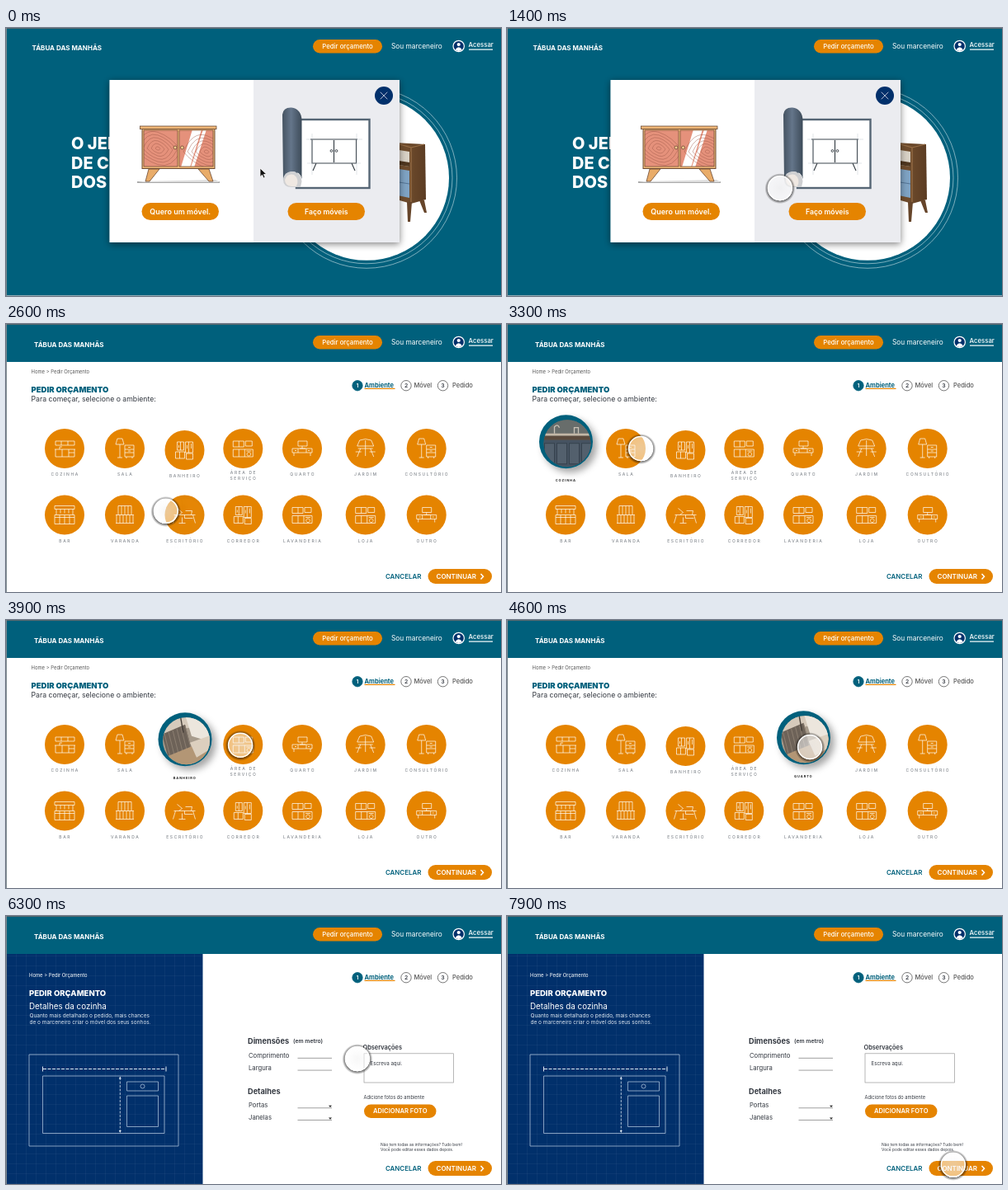
Recreate the animation shown at these times as an HTML page. Size 600 by 325 pixels, loop 8000 ms.

```html
<!DOCTYPE html>
<html lang="pt">
<head>
<meta charset="utf-8">
<title>Pedir orçamento</title>
<style>
html, body { margin: 0; width: 100%; height: 100%; overflow: hidden; background: #fff; }
svg { display: block; width: 100vw; height: 100vh; font-family: Inter, "Open Sans", sans-serif; }
</style>
</head>
<body>
<svg id="stage" viewBox="0 0 600 325" preserveAspectRatio="none"></svg>
<script>
const LOOP = 8000;
const TEAL = '#00607c', ORANGE = '#e58400', NAVY = '#01306b', INK = '#333840';
const stage = document.getElementById('stage');

// Drawing helpers
const text = (x, y, str, size, fill = INK, weight = 400, extra = '') =>
  `<text x="${x}" y="${y}" font-size="${size}" fill="${fill}" font-weight="${weight}" ${extra}>${str}</text>`;
const mid = 'text-anchor="middle"';
const rect = (x, y, w, h, fill, extra = '') =>
  `<rect x="${x}" y="${y}" width="${w}" height="${h}" fill="${fill}" ${extra}/>`;
const circle = (x, y, r, fill, extra = '') =>
  `<circle cx="${x}" cy="${y}" r="${r}" fill="${fill}" ${extra}/>`;
const line = (d, stroke, width = 1, extra = '') =>
  `<path d="${d}" fill="none" stroke="${stroke}" stroke-width="${width}" ${extra}/>`;
const shape = (d, fill, extra = '') => `<path d="${d}" fill="${fill}" ${extra}/>`;
const pill = (x, y, w, h, label, size, weight = 500) =>
  rect(x, y, w, h, ORANGE, `rx="${h / 2}"`) +
  text(x + w / 2, y + h / 2 + size * .35, label, size, '#fff', weight, mid);
const repeat = (n, fn) => Array.from({ length: n }, (_, i) => fn(i)).join('');

const defs = `<defs>
  <filter id="shadow" x="-20%" y="-20%" width="140%" height="150%"><feDropShadow dx="0" dy="2" stdDeviation="4" flood-opacity=".5"/></filter>
  <filter id="cardShadow" x="-40%" y="-40%" width="190%" height="190%"><feDropShadow dx="5" dy="5" stdDeviation="4" flood-opacity=".35"/></filter>
  <linearGradient id="roll"><stop stop-color="#455361"/><stop offset=".45" stop-color="#64758a"/><stop offset="1" stop-color="#3d4b59"/></linearGradient>
  <linearGradient id="walnut"><stop stop-color="#7d5733"/><stop offset="1" stop-color="#5b3c23"/></linearGradient>
  <radialGradient id="lens"><stop stop-color="#f2f2f2" stop-opacity=".62"/><stop offset="1" stop-color="#fff" stop-opacity=".5"/></radialGradient>
  <radialGradient id="halo"><stop offset=".8" stop-opacity="0"/><stop offset=".81" stop-opacity=".55"/><stop offset="1" stop-opacity="0"/></radialGradient>
  <pattern id="grid" width="12" height="12" patternUnits="userSpaceOnUse">${line('M0 .5H12M.5 0V12', '#fff', .5, 'opacity=".08"')}</pattern>
  <clipPath id="leftDoor"><path d="M167 124h41v44h-41z"/></clipPath>
  <clipPath id="rightDoor"><path d="M210 124h41v44h-41z"/></clipPath>
  <clipPath id="photo"><circle cx="1.5" cy="2" r="28.5"/></clipPath>
</defs>`;

const nav = (x, y) =>
  text(x, y, 'TÁBUA DAS MANHÃS', 8, '#fff', 700) +
  pill(372, 14, 84, 16.5, 'Pedir orçamento', 7.8) +
  text(467, 24.7, 'Sou marceneiro', 8.3, '#fff') +
  circle(548.7, 22, 6.7, NAVY, 'stroke="#fff" stroke-width="1.2"') +
  circle(548.7, 20, 2.1, '#fff') + shape('M544.6 26.3q4.1-6 8.2 0q-4.1 3.2-8.2 0z', '#fff') +
  text(560.5, 22.8, 'Acessar', 7.8, '#fff', 500) + rect(561, 25.5, 29, 1.2, '#fff');
const windowEdge = rect(0, 0, 600, 1, '#56676e') + rect(0, 0, 1, 325, '#7d8a90');

// Landing page with the choice dialog
function grain(cx, cy, clip) {
  return `<g clip-path="url(#${clip})">` + repeat(6, i => {
    const r = 3 + i * 5;
    return line(`M${cx - r} ${cy}q${r * .4} ${-r * .9} ${r} ${-r * .7}t${r} ${r * .8}q${-r * .4} ${r * .8} ${-r} ${r * .6}t${-r} ${-r * .7}`, '#9a5646', .45);
  }) + '</g>';
}

const woodCabinet =
  line('M159 187H259', '#555', 1) + shape('M166 186l88-2 5 3H160z', '#ddd') +
  shape('M173 171h13l-12 15h-5zM233 171h13l5 15h-5z', '#e9ac69', 'stroke="#6b4a33" stroke-width=".8"') +
  rect(165, 122, 88, 48.5, '#efb778', 'stroke="#6b4a33"') +
  rect(162.5, 119, 92.5, 3.6, '#efb778', 'stroke="#6b4a33" stroke-width=".8"') +
  rect(167, 124, 41, 44, '#e5917b') + rect(210, 124, 41, 44, '#e5917b') +
  `<g clip-path="url(#rightDoor)">${shape('M226 123h11l-14 46h-11zM239 123h4l-15 46h-4z', '#fff')}</g>` +
  grain(184, 146, 'leftDoor') + grain(243, 150, 'rightDoor') +
  line('M167 124H208V168H167ZM210 124H251V168H210Z', '#6b4a33', .7) +
  circle(205, 145, 2, '#f5c98e', 'stroke="#6b4a33" stroke-width=".8"') +
  circle(213.5, 145, 2, '#f5c98e', 'stroke="#6b4a33" stroke-width=".8"');

const blueprintRoll =
  rect(352, 111, 88.5, 83, '#fff', 'stroke="#566675" stroke-width="2.4"') +
  line('M369 135H426M371 135V164H424.5V135M397.5 136V163M376 164l-4 9M419 164l4 9', '#30383f', 1.1) +
  line('M364 135H432M371 128V178M425 128V178M365 164H430', '#b4bdc6', .4) +
  circle(394.5, 149, 1.4, 'none', 'stroke="#30383f" stroke-width=".9"') +
  circle(400.5, 149, 1.4, 'none', 'stroke="#30383f" stroke-width=".9"') +
  shape('M335 105Q336 96 346 96.5Q358 98 358.5 112V183Q357 174 347 174Q336 175 336 186Z', 'url(#roll)') +
  shape('M336 184Q337 174 347 174Q358 175 358.5 186L357 193H346Q336 193 336 184Z', '#cfd0d2') +
  shape('M338 184Q341 176 349 178Q356 183 352 192H346Q338 191 338 184Z', '#efe8e2');

const landing = rect(0, 0, 600, 325, TEAL) + nav(31.5, 26.5) +
  ['O JEITO FÁCIL', 'DE CRIAR MÓVEIS', 'DOS SEUS'].map((s, i) => text(79, 147 + i * 23.7, s, 20, '#fff', 800)).join('') +
  circle(437, 181.8, 100, '#fff') +
  circle(437, 181.8, 104, 'none', 'stroke="#fff" stroke-width=".7" opacity=".7"') +
  circle(437, 181.8, 109.5, 'none', 'stroke="#fff" stroke-width=".7" opacity=".7"') +
  shape('M470 139L508 141L509 208L491 213L470 207Z', 'url(#walnut)') +
  shape('M470 147L489 150V168L470 165Z', '#d9d2c6') + shape('M470 160L489 163V168L470 165Z', '#50371f') +
  shape('M470 170L489 173V206L470 202Z', '#7fa3c4') + line('M470 186L489 189', '#48688a', .8) +
  line('M470 139L491 145L507 141M491 145V211', '#9a7148', 1.2) +
  shape('M486 211h6l-2 24h-3zM501 209h6l3 15h-3zM470 206h7l-3 12z', '#66452a') +
  `<g filter="url(#shadow)">${rect(125.5, 63, 351.5, 197, '#fff')}</g>` +
  rect(300, 63, 177, 197, '#ebecf0') +
  woodCabinet + blueprintRoll +
  pill(164.5, 212, 93.5, 21, 'Quero um móvel.', 9, 600) +
  pill(341.5, 212, 93.5, 21, 'Faço móveis', 8.7, 600) +
  circle(458, 82, 11, NAVY) + line('M453.7 77.7l8.6 8.6M462.3 77.7l-8.6 8.6', '#d5deea', .8) +
  rect(0, 324, 600, 1, '#8fa9b2') + windowEdge;

// Shared parts of the order pages
const steps = [[426, 'Ambiente', 434.5], [485, 'Móvel', 494.5], [529.5, 'Pedido', 541]].map(([x, label, lx], i) =>
  circle(x, 74.7, 6.2, i ? '#fff' : TEAL, `stroke="${i ? '#555' : TEAL}" stroke-width=".8"`) +
  text(x, 77.2, i + 1, 6.8, i ? INK : '#fff', 600, mid) +
  text(lx, 76.6, label, 7.5, i ? '#555' : TEAL, i ? 500 : 700)).join('') + rect(434.5, 77.8, 37, 1.2, ORANGE);

const footer = text(460, 309.2, 'CANCELAR', 7.9, TEAL, 600) +
  rect(511.5, 297, 77.5, 18, ORANGE, 'rx="9"') +
  text(521.5, 309.2, 'CONTINUAR', 8, '#fff', 600) + line('M575.5 303l3 3.3l-3 3.3', '#fff', 1.5);

const orderPage = body => rect(0, 0, 600, 325, '#fff') + body +
  rect(0, 0, 600, 46, TEAL) + nav(34, 27.5) + steps + footer + windowEdge;

// Room icons, drawn around 0,0
const icons = {
  sink: 'M-11-9h23v5h-23zM-4-9v5M4-9v5M-12 1h25M-11 1v9h23V1M-3 1v9M5 1v9M-6 1v-3h3M5 5h7',
  lamp: 'M-9-12h6l2 7h-10zM-6-5v16M-9 11h6M0-4h11v14H0zM0 1h11M0 5h11M4-1.5h3M4 3h3M2 10v2M9 10v2',
  wardrobe: 'M-9-10h8V0h-8zM1-10h9V3H1zM-11 2h11v8h-11zM2 4h8v7H2zM-5-10V0M5-10V3M-6 2v8M-7-6v3M3-6v4M8-8v6',
  laundry: 'M-12-9H1v7h-13zM3-9h8v6H3zM-5-9v7M-12 1h24v9h-24zM-5 1v9M2 1v9M4 3h6M7 4.5a2.3 2.3 0 1 0 .1 0',
  dresser: 'M-12 0H12v5H-12zM-5 0v5M5 0v5M-10 5v4M10 5v4M-5-9H6v6H-5zM0-3v3M-3 0h7M-9 2.5h2M7 2.5h2',
  picnic: 'M-7-10Q0-13 7-10L10-3H-10zM0-10V9M-9 0H9M-12 4h7M5 4h7M-6 0l-4 10M6 0l4 10',
  bar: 'M-12-11h24v4h-24zM-10-7V0M10-7V0M-12 0h24v11h-24zM-6 0v11M0 0v11M6 0v11M-5-7v5M0-7v5M5-7v5M-12 3h24',
  balcony: 'M-8-11h16V0M-8-11V0M0-11V0M-4-11V0M4-11V0M-11 0h22M-11 10h22M-10 0v10M-6 0v10M-2 0v10M2 0v10M6 0v10M10 0v10',
  desk: 'M-13 0H13M-11 0l-3 10M10 0l3 10M-9-8l6 5M-3-3l-4 3M1-5h8L8 0M0 0v4h10M-3 3v7M-7 10h8'
};
const columns = [71, 144, 216.5, 287.3, 359, 435.7, 509.7];
const rooms = [
  ['COZINHA', 'sink'], ['SALA', 'lamp'], ['BANHEIRO', 'wardrobe'], ['ÁREA DE|SERVIÇO', 'laundry'],
  ['QUARTO', 'dresser'], ['JARDIM', 'picnic'], ['CONSULTÓRIO', 'lamp'],
  ['BAR', 'bar'], ['VARANDA', 'balcony'], ['ESCRITÓRIO', 'desk'], ['CORREDOR', 'wardrobe'],
  ['LAVANDERIA', 'laundry'], ['LOJA', 'laundry'], ['OUTRO', 'dresser']
].map(([label, icon], i) => {
  const drop = i === 2 ? 2 : 0;
  return { label, icon, x: columns[i % 7], y: (i < 7 ? 151 : 231.5) + drop, labelY: (i < 7 ? 184 : 265) + drop };
});
const roomButton = ({ label, icon, x, y, labelY }, i) => {
  const parts = label.split('|');
  const top = labelY - (parts.length > 1 ? 2 : 0);
  return `<g id="room${i}">` + circle(x, y, 24, ORANGE) +
    line(icons[icon], '#fff', .7, `transform="translate(${x} ${y})"`) +
    parts.map((s, n) => text(x + .7, top + n * 6.5, s, 5, '#858a90', 500, mid + ' letter-spacing="1.6"')).join('') + '</g>';
};

const kitchenPhoto = rect(-30, -30, 64, 64, '#5d6361') +
  rect(-30, -30, 64, 20, '#686d6b') + rect(-30, -10, 64, 3, '#c3b7a6') + rect(-30, -7, 64, 5, '#5b4a3d') +
  rect(-30, -2, 64, 36, '#465361') +
  repeat(4, i => rect(-26 + i * 15, 2, 12, 25, '#53606d', 'stroke="#36424e"')) +
  line('M-14-10v-8q4-4 6 1M10-10v-7h5v7', '#c9c2b6', 1.3);
const bedroomPhoto = rect(-30, -30, 64, 64, '#a79b8c') +
  shape('M-30-30H34V-2L4-14L-30-4Z', '#d6cabb') + shape('M0-30h34V4L8-4Z', '#ece6dd') +
  shape('M-28-6L0-18L8 12L-20 24Z', '#6d6258') +
  repeat(6, i => line(`M${-25 + i * 5} ${-7 - i * 2}l7 28`, '#8b7e70', 1)) +
  shape('M-20 20L34-2V34H-20Z', '#b39675') + shape('M6 4L34-6V10L14 22Z', '#dccfbe') +
  line('M-6-30L-2-8', '#463f39', 1.4);

const cardMarkup = ({ label, x, labelY }, i) => `<g id="card${i}"><g id="disc${i}">` +
  `<g filter="url(#cardShadow)">${circle(0, 0, 32.5, TEAL)}</g>` +
  `<g clip-path="url(#photo)">${i ? bedroomPhoto : kitchenPhoto}</g></g>` +
  text(x + .3, labelY + 6.5, label.replace('|', ' '), 4, '#222', 700, mid + ' letter-spacing=".9"') + '</g>';

const roomPage = orderPage(
  text(30.5, 60.3, 'Home &gt; Pedir Orçamento', 5.9, '#555') +
  text(30.5, 83, 'PEDIR ORÇAMENTO', 9.5, TEAL, 900) +
  text(30.5, 94, 'Para começar, selecione o ambiente:', 8.7) +
  rooms.map(roomButton).join('') + rooms.map(cardMarkup).join(''));

// Details form
const pale = '#a9bdd6';
const field = (y, label, list) => text(294, y, label, 7.7) + rect(353.5, y + .2, 41.5, .7, '#777') +
  (list ? shape(`M391 ${y - 2.5}h4l-2 2.3z`, '#222') : '');
const formPage = orderPage(
  rect(0, 46, 238.5, 279, NAVY) + rect(0, 46, 238.5, 279, 'url(#grid)') +
  text(28, 74.4, 'Home &gt; Pedir Orçamento', 5.9, '#fff') +
  text(28, 97, 'PEDIR ORÇAMENTO', 9.5, '#fff', 800) +
  text(28, 112.8, 'Detalhes da cozinha', 9.8, '#fff') +
  text(28.5, 123.2, 'Quanto mais detalhado o pedido, mais chances', 6.5, '#dfe7f1') +
  text(28.5, 131, 'de o marceneiro criar o móvel dos seus sonhos.', 6.5, '#dfe7f1') +
  line('M28 168H209V279H28ZM44.5 194H192V263.5H44.5ZM146.5 201H184.5V212H146.5ZM146.5 218H184.5V255.5H146.5Z', pale, .8) +
  circle(165.5, 206.5, 2.5, 'none', `stroke="${pale}" stroke-width=".8"`) +
  line('M45 185.5H194', '#dfe7f1', 1, 'stroke-dasharray="4 1.5"') + line('M44.5 182.5v6M194 182.5v6', '#dfe7f1') +
  line('M138.3 196V262', '#dfe7f1', .8, 'stroke-dasharray="3 1.5"') +
  shape('M138.3 194.5l1.5 3h-3zM138.3 263l1.5-3h-3z', '#dfe7f1') +
  text(293, 154.8, 'Dimensões', 9.2, INK, 700) + text(348, 154.3, '(em metro)', 6.8, INK, 600) +
  field(171.7, 'Comprimento') + field(186.5, 'Largura') +
  text(293, 216, 'Detalhes', 9.2, INK, 700) + field(232.3, 'Portas', true) + field(247, 'Janelas', true) +
  text(432.5, 162.2, 'Observações', 7.4, INK, 600) +
  rect(434, 166.8, 108.5, 35.2, '#fff', 'stroke="#999" stroke-width=".7"') +
  text(441.5, 181, 'Escreva aqui.', 6.2) +
  text(433.5, 222, 'Adicione fotos do ambiente', 5.7) +
  pill(434, 228.5, 87.5, 16.5, 'ADICIONAR FOTO', 7.6, 600) +
  text(454, 279, 'Não tem todas as informações? Tudo bem!', 4.9) +
  text(454, 285.2, 'Você pode editar esses dados depois.', 4.9));

const ROOMS_START = 2400, FORM_START = 5850, RING_START = 700;
const pages = [['landing', landing, 0], ['rooms', roomPage, ROOMS_START], ['form', formPage, FORM_START]];
stage.innerHTML = defs + pages.map(([id, body]) => `<g id="${id}">${body}</g>`).join('') +
  `<g id="arrow">${shape('M0 0V10.5l2.5-2.3 1.7 3.8 1.9-.8-1.7-3.7h3.5z', '#111', 'stroke="#fff" stroke-width=".8"')}</g>` +
  `<g id="ring">${circle(0, .6, 18.5, 'url(#halo)')}${circle(0, 0, 14.5, 'url(#lens)', 'stroke="#fff" stroke-width="1.5"')}</g>`;

// Motion
const route = [
  [0, 308, 170], [700, 310, 172], [1200, 330, 193], [1400, 331, 194], [2000, 204, 225], [2600, 194, 227],
  [2900, 72, 150], [3100, 86, 150], [3300, 162, 151], [4250, 346, 152], [4600, 367, 154],
  [5050, 436, 154], [5550, 546, 305], [5850, 548, 306], [6300, 426, 173], [6550, 384, 172],
  [6900, 384, 235], [7200, 474, 238], [7600, 540, 301], [8000, 541, 302]
];
const $ = id => document.getElementById(id);
const smooth = v => v * v * (3 - 2 * v);

function cursorAt(t) {
  const i = route.findIndex(p => p[0] > t);
  const [t0, x0, y0] = route[i - 1], [t1, x1, y1] = route[i];
  const u = (t - t0) / (t1 - t0), k = (u + smooth(u)) / 2;
  return [x0 + (x1 - x0) * k, y0 + (y1 - y0) * k];
}

// A room grows with the share of a short, delayed window spent under the cursor.
const HOVER_DELAY = 200, HOVER_STEP = 8, HOVER_SAMPLES = 15;
function hoverTrail(t) {
  return Array.from({ length: HOVER_SAMPLES }, (_, i) => t - HOVER_DELAY - i * HOVER_STEP)
    .filter(s => s >= ROOMS_START).map(cursorAt);
}
const hoverAmount = (room, trail) =>
  smooth(trail.filter(([x, y]) => Math.hypot(x - room.x, y - room.y) < 24).length / HOVER_SAMPLES);

function render(t) {
  pages.forEach(([id, , start], i) => {
    const end = i + 1 < pages.length ? pages[i + 1][2] : LOOP;
    $(id).style.display = t >= start && t < end ? '' : 'none';
  });
  const trail = hoverTrail(t);
  rooms.forEach((room, i) => {
    const k = hoverAmount(room, trail);
    $('card' + i).style.display = k ? '' : 'none';
    $('card' + i).setAttribute('opacity', k);
    $('disc' + i).setAttribute('transform', `translate(${room.x + .5 * k} ${room.y - 8.3 * k}) scale(${.74 + .26 * k})`);
    $('room' + i).setAttribute('opacity', 1 - k);
  });
  const [x, y] = cursorAt(t);
  $('arrow').style.display = t < RING_START ? '' : 'none';
  $('ring').style.display = t < RING_START ? 'none' : '';
  for (const id of ['arrow', 'ring']) $(id).setAttribute('transform', `translate(${x} ${y})`);
}

const began = performance.now();
function tick() {
  render((performance.now() - began) % LOOP);
  requestAnimationFrame(tick);
}
tick();
</script>
</body>
</html>
```
